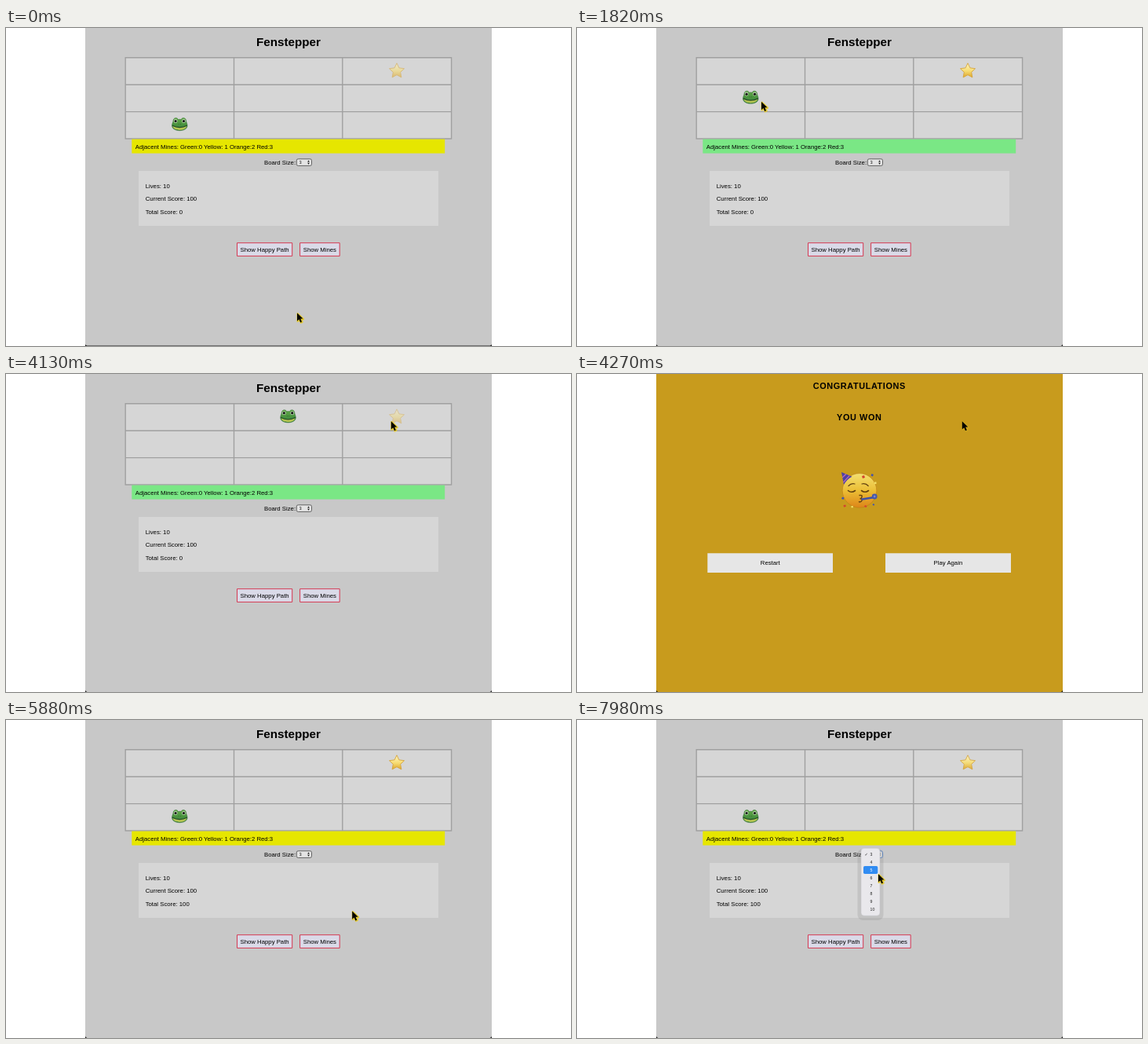
These frames come from a looping animation (720 px wide and 405 px high, 8000 ms). An HTML page:

```html
<!DOCTYPE html>
<html lang="en">
<head>
<meta charset="utf-8">
<title>Fenstepper</title>
<style>
html, body { margin: 0; width: 100%; height: 100%; overflow: hidden; background: #fff; }
svg { display: block; width: 100vw; height: 100vh; font: 7.75px "Liberation Sans", Arial, sans-serif; }
.mid { text-anchor: middle; }
.head { font-weight: bold; font-size: 10.9px; letter-spacing: .6px; text-anchor: middle; }
.line { fill: none; stroke-linecap: round; stroke-linejoin: round; }
#menu text { font-size: 5.2px; }
</style>
</head>
<body>
<svg viewBox="0 0 720 405">
  <defs>
    <linearGradient id="gold" x2="0" y2="1">
      <stop stop-color="#fff6c4"/><stop offset=".55" stop-color="#f6dc72"/><stop offset="1" stop-color="#dda52c"/>
    </linearGradient>
    <linearGradient id="skin" x2="0" y2="1">
      <stop stop-color="#f3df70"/><stop offset=".5" stop-color="#ebbe35"/><stop offset="1" stop-color="#dd8518"/>
    </linearGradient>
    <linearGradient id="green" x2="0" y2="1">
      <stop stop-color="#62a846"/><stop offset="1" stop-color="#34803a"/>
    </linearGradient>
  </defs>

  <g id="game">
    <path fill="#c8c8c8" d="M101 0H619V405H101z"/>
    <text class="mid" x="360" y="23" font-size="15.2" font-weight="bold">Fenstepper</text>
    <path fill="#d6d6d6" stroke="#a0a0a0" stroke-width="1.4"
      d="M152.2 37.7H567.6V141H152.2zM290.5 37.7V141M428.8 37.7V141M152.2 72.2H567.6M152.2 106.6H567.6"/>
    <path id="star" fill="url(#gold)" stroke="#d5a43b" stroke-width=".9" stroke-linejoin="round"/>
    <g id="frog">
      <path fill="url(#green)" stroke="#2d6933" stroke-width=".5"
        d="M-9.8 1.5C-9.8-1-8.5-2.5-8.3-4.5C-8-9.3-2.5-9-2-6.2Q0-6.8 2-6.2C2.5-9 8-9.3 8.3-4.5C8.5-2.5 9.8-1 9.8 1.5C9.8 10-9.8 10-9.8 1.5z"/>
      <path fill="#b5c452" d="M-8.8 2.2Q0 5 8.8 2.2C8 8.8-8 8.8-8.8 2.2z"/>
      <path class="line" stroke="#234a27" stroke-width="1.3" d="M-9 1.5Q-5 3.8 0 3.8T9 1.5"/>
      <g fill="#e9efdf"><circle cx="-5.2" cy="-4.3" r="2.3"/><circle cx="5.2" cy="-4.3" r="2.3"/></g>
      <g fill="#151d15"><circle cx="-5.2" cy="-4.2" r="1.7"/><circle cx="5.2" cy="-4.2" r="1.7"/>
        <circle cx="-1.2" cy="-.6" r=".4"/><circle cx="1.2" cy="-.6" r=".4"/></g>
    </g>
    <rect id="bar" x="160.3" y="141.6" width="398.9" height="18"/>
    <text x="164.8" y="154">Adjacent Mines: Green:0 Yellow: 1 Orange:2 Red:3</text>
    <text x="329" y="173.8">Board Size:</text>
    <rect id="select" x="370.3" y="166.8" width="19.2" height="8.6" rx="2" fill="#e4e4e4" stroke-width=".9"/>
    <text x="373.7" y="173" font-size="5.2">3</text>
    <path d="M384.2 170.6l1.3-2 1.3 2zM384.2 171.8l1.3 2 1.3-2z"/>
    <path fill="#d6d6d6" d="M169 182H551V252H169z"/>
    <text x="177.7" y="203.8">Lives: 10</text>
    <text x="177.7" y="220.2">Current Score: 100</text>
    <text id="total" x="177.7" y="236.6"></text>
    <path fill="#dadae8" stroke="#d43850" d="M294.5 273.7H364.7V290.4H294.5zM374.6 273.7H425.2V290.4H374.6z"/>
    <text class="mid" x="329.6" y="284.6">Show Happy Path</text>
    <text class="mid" x="399.9" y="284.6">Show Mines</text>
    <path id="edge" fill="#555" d="M101 404.2H619V405H101z"/>
    <g id="menu">
      <rect x="357.5" y="164" width="33" height="91" rx="7" fill="#777" opacity=".2"/>
      <rect x="362" y="163.3" width="24" height="86" rx="4" fill="#e9e8ec" stroke="#c2c2c6" stroke-width=".5"/>
      <rect id="pick" x="365" width="18.3" height="10" rx="1.8" fill="#318cf2"/>
    </g>
  </g>

  <g id="win">
    <path fill="#c89b1d" d="M101 0H619V405H101z"/>
    <text class="head" x="359.8" y="18.8">CONGRATULATIONS</text>
    <text class="head" x="359.8" y="59.4">YOU WON</text>
    <circle cx="360" cy="148.4" r="21.8" fill="url(#skin)" stroke="#bd7d18" stroke-width=".6"/>
    <path fill="#4b40a8" d="M337 125L340 141Q344 134 350.5 130.8z"/>
    <path class="line" stroke="#c06db4" stroke-width="1.2" d="M338.5 131.5l4-3.8M339.8 137.5l7-7.7"/>
    <g class="line" stroke="#61400f">
      <path stroke-width="1.6" d="M345.5 148.5q4.2 3.5 9 0M362.5 148.5q4.5 3.5 9 0"/>
      <path stroke-width="1.2" d="M346 142.5q3.5-3.8 8-2.5M363 140q4.8-1.3 8.2 2.5"/>
      <path stroke-width="1.4" d="M360 154.5q4-.6 3 2t-2 2.2q3 .5 2 2.6t-3.5 1.5"/>
    </g>
    <path class="line" stroke="#3f50a5" stroke-width="2.6" d="M363.5 159.5L379 157"/>
    <circle cx="379.2" cy="156" r="3.4" fill="#4658aa"/>
    <circle cx="379.2" cy="156" r="1.4" fill="#7f88c7"/>
    <path fill="#d4442f" d="M363 130l3-1 1 3-3 1zM339.5 167l2.8-.5.5 2.6-2.8.5zM367 167l2.5 1-1 2-2.5-1z"/>
    <path fill="#4354ad" d="M375.5 127l2.4 1-1 2.4-2.4-1zM338 156.5l2.6 1-1 2.5-2.6-1zM377.5 165l1.8 1-1 1.8-1.8-1z"/>
    <path fill="#f2dc65" d="M379 137.5h2.5v2.5H379zM349.5 168h2.3v2.3h-2.3z"/>
    <path fill="#e6e6e6" d="M166.3 228.2H326V253H166.3z"/>
    <path id="again" d="M393 228.2H553V253H393z"/>
    <text class="mid" x="246.3" y="243.2">Restart</text>
    <text class="mid" x="472.9" y="243.2">Play Again</text>
  </g>

  <path d="M101 402.5Q101.3 404.7 103.5 405H101zM619 402.5Q618.7 404.7 616.5 405H619z"/>
  <g id="cursor">
    <g id="arrow">
      <path class="line" id="halo" stroke="#e5c922" stroke-width="2.4" d="M.7.8V10.4L3 8.3 4.8 12.2 6.5 11.4 4.9 7.7H7.8z"/>
      <path d="M0 0V10.2L2.4 8 4.2 12 6 11.2 4.3 7.3H7.4z"/>
    </g>
    <g id="beam" class="line">
      <path stroke="#e5c93a" stroke-width="3" d="M-2 -5.5H3M.5 -5.5V6.5M-2 6.5H3"/>
      <path stroke="#29251a" stroke-width="1.1" d="M-2 -5.5H3M.5 -5.5V6.5M-2 6.5H3M-.8 1.5H1.8"/>
    </g>
  </g>
</svg>
<script>
const $ = id => document.getElementById(id);
const LOOP = 8000, STEP = 70, WIN = 4200, AGAIN = 5880, OPEN = 7140;
const YELLOW = '#e6e600', GREEN = '#7ae785', ORANGE = '#e89500';

// time, column, row, bar colour
const hops = [
  [0, 0, 2, YELLOW], [1680, 0, 1, GREEN], [2590, 1, 1, ORANGE],
  [3430, 1, 0, GREEN], [AGAIN, 0, 2, YELLOW]
];
// time, x, y
const moves = [
  [700, 371, 363], [1540, 235, 94], [2100, 235, 94], [2450, 361, 93],
  [2700, 361, 93], [3220, 361, 60], [3500, 361, 60], [4060, 490.8, 60.3],
  [4620, 490.8, 60.3], [5180, 441.2, 243.5], [6200, 441.2, 243.5],
  [6900, 380, 170], [7210, 380, 170], [7910, 384, 196.3]
];

const starPoints = Array.from({ length: 10 }, (_, i) => {
  const a = i * Math.PI / 5, r = i % 2 ? 4.9 : 10;
  return `${498 + r * Math.sin(a)} ${54.8 - r * Math.cos(a)}`;
});
$('star').setAttribute('d', `M${starPoints.join('L')}z`);

function addText(x, y, str) {
  const el = document.createElementNS('http://www.w3.org/2000/svg', 'text');
  el.setAttribute('x', x);
  el.setAttribute('y', y);
  el.textContent = str;
  $('menu').append(el);
  return el;
}
const items = Array.from({ length: 8 }, (_, i) => addText(373.5, 173 + i * 10, i + 3));
const check = addText(366.4, 173, '✓');

const show = (id, on) => $(id).setAttribute('display', on ? 'inline' : 'none');
const set = (id, name, value) => $(id).setAttribute(name, value);
const place = (id, x, y) => set(id, 'transform', `translate(${x} ${y})`);

function pointer(t) {
  const i = moves.findIndex(m => m[0] > t);
  if (i < 0) return moves.at(-1).slice(1);
  if (!i) return moves[0].slice(1);
  const [t0, x0, y0] = moves[i - 1], [t1, x1, y1] = moves[i];
  const u = (t - t0) / (t1 - t0), k = u * u * (3 - 2 * u);
  return [x0 + (x1 - x0) * k, y0 + (y1 - y0) * k];
}

function draw(t) {
  const won = t >= WIN && t < AGAIN;
  const [x, y] = pointer(t);
  show('game', !won);
  show('win', won);

  const [, col, row, colour] = hops.findLast(h => h[0] <= t);
  place('frog', 221.3 + col * 138.2, 122.8 - (2 - row) * 34.4);
  set('bar', 'fill', colour);
  const phase = t < AGAIN ? Math.max(t, 560) - 810 : t - AGAIN;
  set('star', 'opacity', .6 + .4 * Math.cos(phase * Math.PI / 500));
  $('total').textContent = `Total Score: ${t < AGAIN ? 0 : 100}`;
  show('edge', t < 630);

  const open = t >= OPEN;
  show('menu', open);
  set('select', 'stroke', open ? '#4d7fc9' : '#555');
  const picked = Math.max(0, Math.floor((y - 167) / 10));
  set('pick', 'y', 166 + picked * 10);
  items.forEach((el, i) => el.setAttribute('fill', i === picked ? '#fff' : '#222'));
  check.setAttribute('fill', picked ? '#222' : '#fff');

  const hover = x > 393 && x < 553 && y > 228 && y < 253;
  set('again', 'fill', hover ? '#e4e427' : '#e6e6e6');
  const beam = !won && x > 345 && x < 378 && y < 72;
  show('beam', beam);
  show('arrow', !beam);
  set('halo', 'opacity', won ? .25 : .9);
  place('cursor', x, y);
}

function tick(now) {
  draw(Math.floor(now % LOOP / STEP) * STEP);
  requestAnimationFrame(tick);
}
draw(0);
requestAnimationFrame(tick);
</script>
</body>
</html>
```
